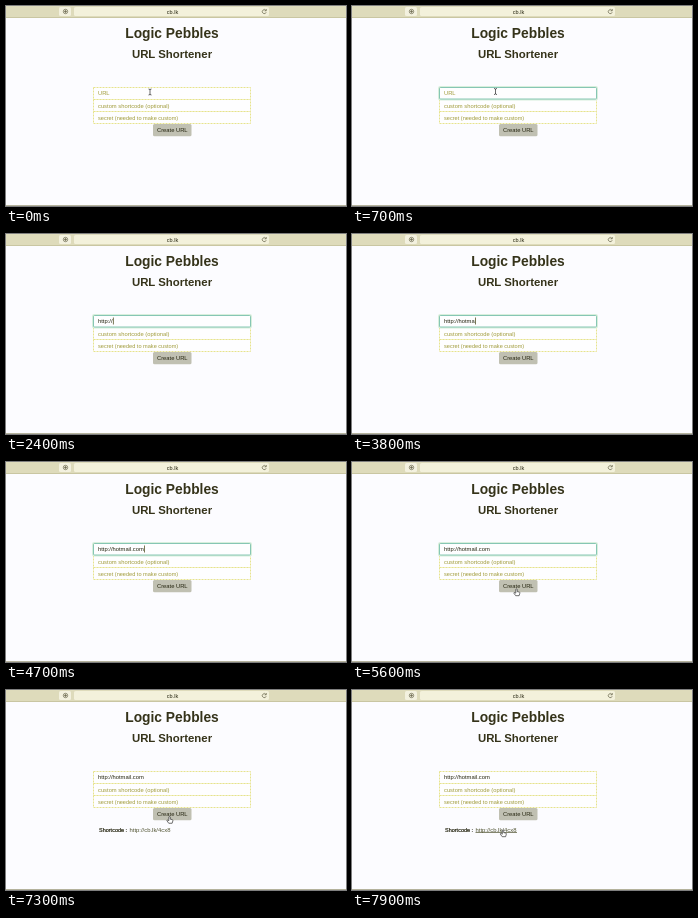
An HTML page that plays this animation: 340 by 200 pixels, repeating every 8000 ms.

```html
<!DOCTYPE html>
<html lang="en">
<head>
<meta charset="utf-8">
<title>URL Shortener</title>
<style>
  html, body { margin: 0; width: 100%; height: 100%; overflow: hidden; background: #fcfcff; }
  svg { display: block; width: 340px; height: 200px; }
  text { font: 5.8px "Liberation Sans", Arial, sans-serif; fill: #24240f; }
  .mid { text-anchor: middle; }
  .heading { font-weight: bold; fill: #35331a; }
  .hint { fill: #a09b3a; }
  .field { fill: #fefeff; stroke: #e6e38c; stroke-dasharray: 2 1; }
  .icon { fill: none; stroke: #66644a; stroke-width: .7; }
</style>
</head>
<body>
<svg viewBox="0 0 340 200">
  <rect width="340" height="200" fill="#fcfcff"/>

  <!-- browser bar -->
  <rect width="340" height="11" fill="#dedbbb"/>
  <rect y="11" width="340" height="1" fill="#c9c6a2"/>
  <rect x="53" y="1" width="12" height="9" rx="1.5" fill="#f3f1df"/>
  <circle class="icon" cx="59.5" cy="5.5" r="2.2"/>
  <path class="icon" d="M59.5 4v3M58 5.5h3"/>
  <rect x="68" y="1" width="195" height="9" rx="1.5" fill="#f3f1db"/>
  <path class="icon" d="M260 4.6a2 2 0 1 0 .2 1.6M260.3 3v1.8h-1.8"/>
  <text class="mid" x="166.5" y="8" style="font-size:5.5px">cb.lk</text>

  <!-- page -->
  <text class="heading mid" x="166" y="32" style="font-size:13.8px">Logic Pebbles</text>
  <text class="heading mid" x="166" y="51.5" style="font-size:11.4px">URL Shortener</text>
  <rect class="field" x="87.5" y="81.5" width="157" height="12"/>
  <rect class="field" x="87.5" y="93.5" width="157" height="12"/>
  <rect class="field" x="87.5" y="105.5" width="157" height="12"/>
  <g id="focus" fill="none">
    <rect x="86.8" y="80.8" width="158.4" height="13" rx="1.5" stroke="#d8efdc" stroke-width="1.6"/>
    <rect x="87.5" y="81.5" width="157" height="11.5" rx="1" stroke="#86c6b4"/>
  </g>
  <text id="hint" class="hint" x="92" y="89">URL</text>
  <text id="url" x="92" y="89"></text>
  <rect id="caret" y="83.5" width=".8" height="7" fill="#55552a"/>
  <text class="hint" x="92" y="101.5">custom shortcode (optional)</text>
  <text class="hint" x="92" y="113.7" style="font-size:5.6px">secret (needed to make custom)</text>
  <rect id="button" x="147" y="118" width="38.5" height="12.3" rx="1.5"/>
  <text class="mid" x="166.3" y="126.2">Create URL</text>

  <g id="result">
    <text x="93" y="141.5" style="font-size:5.5px;stroke:#24240f;stroke-width:.2px">Shortcode :</text>
    <text x="123.5" y="141.5" style="font-size:5.9px;fill:#4f5230">http://cb.lk/4cx8</text>
    <rect id="underline" x="123.5" y="142.3" width="41.5" height=".7" fill="#4f5230"/>
  </g>

  <rect y="199" width="340" height="1" fill="#b4b29c"/>

  <path id="beam" d="M-1.5-3Q0-3 0-2Q0-3 1.5-3M0-2.5V2.5M-1.5 3Q0 3 0 2Q0 3 1.5 3" fill="none" stroke="#444" stroke-width=".8"/>
  <path id="hand" d="M-1.2-3.2q.8-.7 1.4 0v2.3l2.2.5q.6.3.4 1.2l-.7 2.4h-3.4l-1.9-2.6q0-.9 1-.5l1 .6z" fill="#fff" stroke="#333" stroke-width=".7"/>
</svg>
<script>
  const LOOP = 8000, TICK = 100;
  const ADDRESS = "http://hotmail.com";
  const keys = [1500, 1600, 1800, 1900, 2100, 2200, 2300, 2900, 3100, 3300,
    3500, 3700, 3900, 4100, 4300, 4400, 4600, 4700];
  // pointer stops: time, x, y
  const stops = [[0, 144, 86], [400, 143.5, 85.5], [4800, 143.5, 86], [5300, 165, 132],
    [5600, 165, 130.5], [5900, 165.5, 133], [6200, 165.5, 128.5], [7200, 165.5, 128.5],
    [7700, 151.5, 143.5], [8000, 151.5, 143.5]];
  const $ = id => document.getElementById(id);
  const show = (id, on) => $(id).style.display = on ? "" : "none";

  function pointerAt(t) {
    const i = stops.findIndex(s => s[0] > t);
    const [t0, x0, y0] = stops[i - 1], [t1, x1, y1] = stops[i];
    let k = (t - t0) / (t1 - t0);
    k = k * k * (3 - 2 * k);
    return [x0 + (x1 - x0) * k, y0 + (y1 - y0) * k];
  }

  function draw(now) {
    const t = Math.floor(now % LOOP / TICK) * TICK;
    const typed = keys.filter(k => k <= t).length;
    const [x, y] = pointerAt(t);
    const overButton = y > 118 && y < 137 && x > 160;
    const overLink = t >= 7500;
    const hand = overButton || overLink;

    $("url").textContent = ADDRESS.slice(0, typed);
    show("hint", !typed);
    show("focus", t >= 400 && t < 6200);
    show("caret", typed && t < 5300);
    $("caret").setAttribute("x", 92.4 + $("url").getComputedTextLength());
    $("button").setAttribute("fill", t >= 6200 && t < 6700 ? "#b8b8ac" : "#c0c0b2");
    show("result", t >= 6900);
    show("underline", overLink);
    show("beam", !hand && (t < 1500 || t >= 4800));
    show("hand", hand);
    for (const id of ["beam", "hand"]) $(id).setAttribute("transform", `translate(${x} ${y})`);
    requestAnimationFrame(draw);
  }
  requestAnimationFrame(draw);
</script>
</body>
</html>
```
